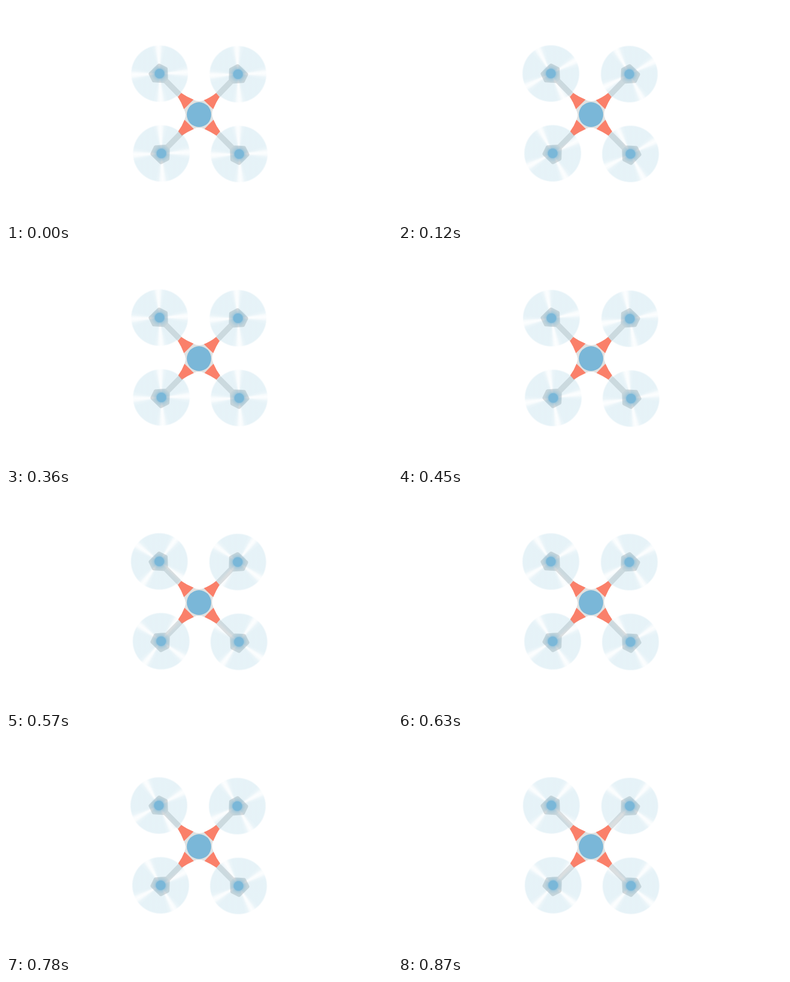
These frames come from a looping animation (640x360 px, 0.9 s). An HTML page:

```html
<!DOCTYPE html>
<html lang="en">
<head>
<meta charset="utf-8">
<title>Drone</title>
<style>
  html, body { margin: 0; width: 100%; height: 100%; overflow: hidden; background: #fff; }
  .stage { position: absolute; left: 0; top: 0; width: 640px; height: 360px; overflow: hidden; }
  svg { position: absolute; left: 0; top: 0; }
  .rotor { position: absolute; width: 96px; height: 96px; margin: -48px 0 0 -48px; }
  .disc, .hub { position: absolute; inset: 0; border-radius: 50%; }
  .disc {
    --blade: rgba(122, 188, 215, .19);
    --edge: rgba(122, 188, 215, .15);
    --soft: rgba(122, 188, 215, .06);
    --ray: rgba(122, 188, 215, .02);
    background: repeating-conic-gradient(
      var(--ray) 0deg, var(--soft) 4.5deg, var(--edge) 9deg, var(--blade) 16deg,
      var(--blade) 74deg, var(--edge) 81deg, var(--soft) 85.5deg, var(--ray) 90deg);
    -webkit-mask: radial-gradient(circle, #000 45.8px, transparent 48.2px);
    mask: radial-gradient(circle, #000 45.8px, transparent 48.2px);
  }
  .hub {
    background: radial-gradient(circle, #7ab7d8 7.4px, rgba(122, 183, 216, .42) 9px,
      rgba(122, 183, 216, .2) 11.5px, rgba(122, 183, 216, 0) 15px);
  }
</style>
</head>
<body>
<div class="stage">
  <svg width="640" height="360" viewBox="0 0 640 360">
    <defs>
      <!-- motor mount at the origin, arm running along +x -->
      <g id="arm">
        <path fill="#dee0e1" d="M0 -4.800H62V4.800H0Z"/>
        <path fill="#d6dadc" stroke="#d6dadc" stroke-width="6" stroke-linejoin="round"
              d="M-10.500 -10L1.500 -14L13 -3.500V3.500L1.500 14L-10.500 10Z"/>
      </g>
    </defs>
    <use href="#arm" transform="translate(254 113.5) rotate(45.6)"/>
    <use href="#arm" transform="translate(384 114.5) rotate(133.9)"/>
    <use href="#arm" transform="translate(257 246) rotate(-45.6)"/>
    <use href="#arm" transform="translate(386 247.3) rotate(-134.9)"/>
    <path fill="#dfe2e2" d="M310 156Q319.500 161 328.500 157L343 172Q340 181 344 189.500L329 205Q320 200.500 311 205L296 189.500Q300 181 295 172Z"/>
    <g fill="#fa806a">
      <path d="M290.500 145Q300 151.500 311 156L295 172Q291 161 285 151.500Z"/>
      <path d="M348.500 145Q339 152.500 328 157L343.500 172Q348 161 354 151.500Z"/>
      <path d="M285.500 209Q292 200 296 189.500L311.500 205Q301 209.500 291.500 216Z"/>
      <path d="M355 209Q348.500 200 344 189.500L329 205Q339 209.500 349 216Z"/>
    </g>
    <ellipse cx="320" cy="181" rx="20.200" ry="20.700" fill="#7ab7d8"/>
  </svg>
</div>
<script>
  const STEP = 30, LOOP = 900, WOBBLE = 0.7;
  const stage = document.querySelector('.stage');
  const centres = [[254.2, 113.4], [383.6, 114.4], [257, 245.7], [385.7, 247.4]];

  const rotors = centres.map(([x, y]) => {
    const el = document.createElement('div');
    el.className = 'rotor';
    el.style.left = x + 'px';
    el.style.top = y + 'px';
    el.innerHTML = '<div class="disc"></div><div class="hub"></div>';
    stage.append(el);
    return el;
  });

  // the spin slows a little over the loop and shakes each rotor off its axis
  const spin = n => -2.5 + 151.8 * n - 0.153 * n * n;

  function draw(now) {
    const angle = spin(Math.floor((now % LOOP) / STEP));
    const lean = (angle - 20) * Math.PI / 180;
    const dx = WOBBLE * Math.cos(lean), dy = WOBBLE * Math.sin(lean);
    for (const el of rotors)
      el.style.transform = `translate(${dx}px, ${dy}px) rotate(${angle}deg)`;
  }

  const start = performance.now();
  function tick() {
    draw(performance.now() - start);
    requestAnimationFrame(tick);
  }
  tick();
</script>
</body>
</html>
```
